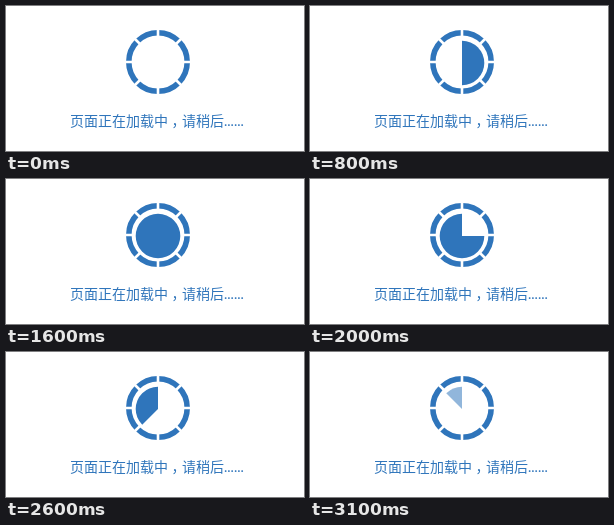
Animation of 298 by 145 pixels, one loop 3200 ms. Source, as an HTML page with a canvas:

```html
<!DOCTYPE html>
<html lang="zh-CN">
<head>
<meta charset="utf-8">
<style>
  html, body { margin: 0; width: 100%; height: 100%; overflow: hidden; background: #fff; }
  canvas { display: block; }
</style>
</head>
<body>
<canvas id="stage" width="298" height="145"></canvas>
<script>
const ctx = document.getElementById('stage').getContext('2d');
const BLUE = '#2f75bb';
const STEP_MS = 100, STEPS = 32, SECTORS = 8;
const SECTOR_ANGLE = 2 * Math.PI / SECTORS;
const CX = 152, RING_Y = 56, PIE_Y = 57, PIE_RADIUS = 22.3;

function drawRing() {
  ctx.strokeStyle = BLUE;
  ctx.lineWidth = 5.6;
  ctx.beginPath();
  ctx.arc(CX, RING_Y, 29.2, 0, 2 * Math.PI);
  ctx.stroke();

  ctx.strokeStyle = '#fff';
  ctx.lineWidth = 2.6;
  ctx.beginPath();
  for (let i = 0; i < SECTORS; i++) {
    const x = Math.cos(i * SECTOR_ANGLE), y = Math.sin(i * SECTOR_ANGLE);
    ctx.moveTo(CX + 24 * x, RING_Y + 24 * y);
    ctx.lineTo(CX + 34 * x, RING_Y + 34 * y);
  }
  ctx.stroke();
}

// Fills the pie between two sector indices, clockwise from the top.
function drawPie(from, to, alpha) {
  if (to <= from) return;
  ctx.globalAlpha = alpha;
  ctx.fillStyle = BLUE;
  ctx.beginPath();
  ctx.moveTo(CX, PIE_Y);
  ctx.arc(CX, PIE_Y, PIE_RADIUS, from * SECTOR_ANGLE - Math.PI / 2, to * SECTOR_ANGLE - Math.PI / 2);
  ctx.fill();
  ctx.globalAlpha = 1;
}

function drawText() {
  ctx.fillStyle = BLUE;
  ctx.font = '500 14px Lato, "Noto Sans CJK SC", "Noto Sans CJK", sans-serif';
  ctx.fillText('页面正在加载中', 64, 120);
  ctx.fillText('，', 165.5, 120); // centred in its cell
  ctx.fillText('请稍后......', 176, 120);
}

function draw() {
  ctx.fillStyle = '#fff';
  ctx.fillRect(0, 0, 298, 145);
  drawRing();

  const step = Math.floor(performance.now() / STEP_MS) % STEPS;
  const emptying = step >= STEPS / 2;
  const progress = (step % (STEPS / 2)) / 2;
  const current = Math.floor(progress);
  if (emptying) drawPie(Math.ceil(progress), SECTORS, 1);
  else drawPie(0, current, 1);
  if (progress > current) drawPie(current, current + 1, 0.53);

  drawText();
  requestAnimationFrame(draw);
}
draw();
</script>
</body>
</html>
```
